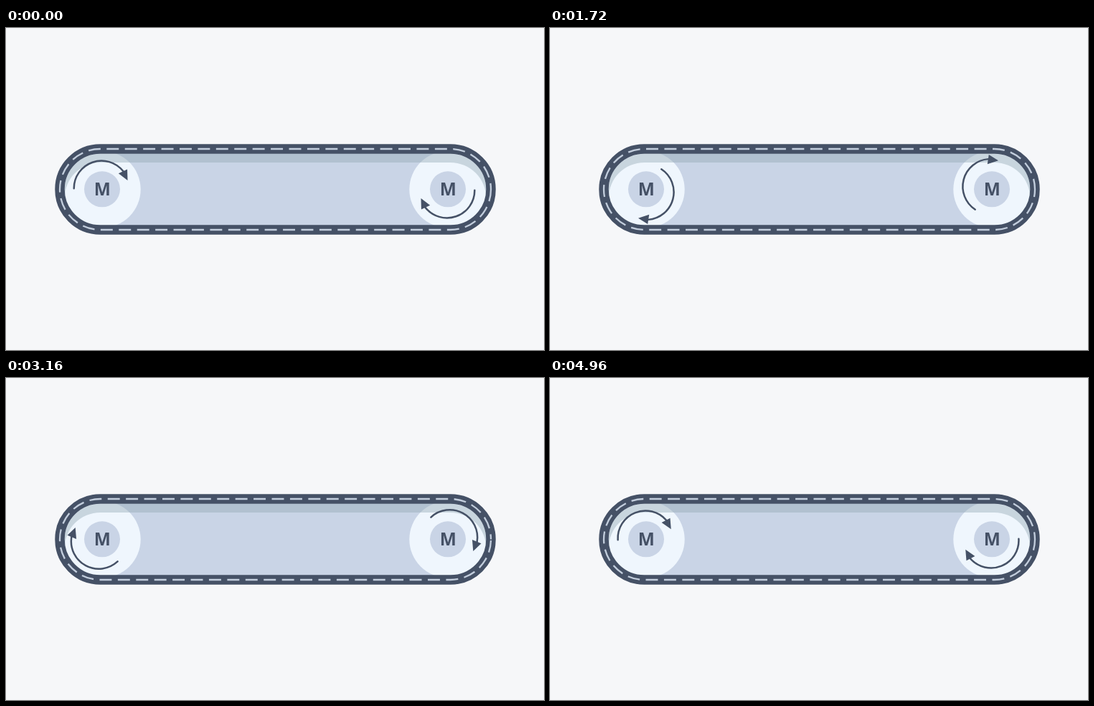
Recreate the animation shown at these times as an HTML page. Size 750 by 450 pixels, loop 5 s.

```html
<!DOCTYPE html>
<html lang="en">
<head>
<meta charset="utf-8">
<title>Conveyor belt</title>
<style>
  html, body { margin: 0; width: 100%; height: 100%; overflow: hidden; background: #f6f7f9; }
  svg { display: block; width: 750px; height: 450px; }
  text { font: 700 24.5px "Open Sans", sans-serif; text-anchor: middle; fill: #455166; }
</style>
</head>
<body>
<svg viewBox="0 0 750 450">
  <defs>
    <path id="loop" d="M676 225.5A56.5 56.5 0 0 1 619.5 282H131.5A56.5 56.5 0 0 1 131.5 169H619.5A56.5 56.5 0 0 1 676 225.5"/>
    <!-- Turns about its own origin, slightly off the arc's centre -->
    <g id="arrow">
      <path d="M-37.5 -2.6A38.5 38.5 0 0 1 31.3 -26.7" fill="none" stroke="#455166" stroke-width="2.5" stroke-linecap="round"/>
      <path d="M37.3 -14L24.6 -23.8L36.8 -29.6Z" fill="#455166"/>
    </g>
  </defs>

  <use href="#loop" fill="#c9d4e6"/>
  <g fill="#eff6fd">
    <circle cx="134" cy="225.5" r="53.7"/>
    <circle cx="616" cy="225.5" r="53.7"/>
  </g>
  <path d="M81.7 225.5A49.8 49.8 0 0 1 131.5 175.7H619.5A49.8 49.8 0 0 1 669.3 225.5V237.8A49.8 49.8 0 0 0 619.5 188H131.5A49.8 49.8 0 0 0 81.7 237.8Z" fill="#8da2af" fill-opacity=".4"/>

  <use href="#loop" fill="none" stroke="#455166" stroke-width="13.5"/>
  <use id="dashes" href="#loop" fill="none" stroke="#c3cedd" stroke-width="2.3" stroke-dasharray="16.95 8.47"/>

  <g fill="#c9d4e6">
    <circle cx="134" cy="225.3" r="25"/>
    <circle cx="616" cy="225.3" r="25"/>
  </g>
  <text x="134.2" y="233.8">M</text>
  <text x="616.2" y="233.8">M</text>

  <use id="left" href="#arrow"/>
  <use id="right" href="#arrow"/>
</svg>
<script>
  const LOOP = 5000, DASH_PERIOD = 25.42, DASHES_PER_LOOP = 8;
  const [dashes, left, right] = ['dashes', 'left', 'right'].map(id => document.getElementById(id));

  function draw() {
    const p = performance.now() % LOOP / LOOP;
    const angle = 360 * p;
    left.setAttribute('transform', `translate(132.2 227) rotate(${angle})`);
    right.setAttribute('transform', `translate(615.8 224) rotate(${angle + 180})`);
    dashes.setAttribute('stroke-dashoffset', -p * DASHES_PER_LOOP * DASH_PERIOD);
    requestAnimationFrame(draw);
  }
  draw();
</script>
</body>
</html>
```
